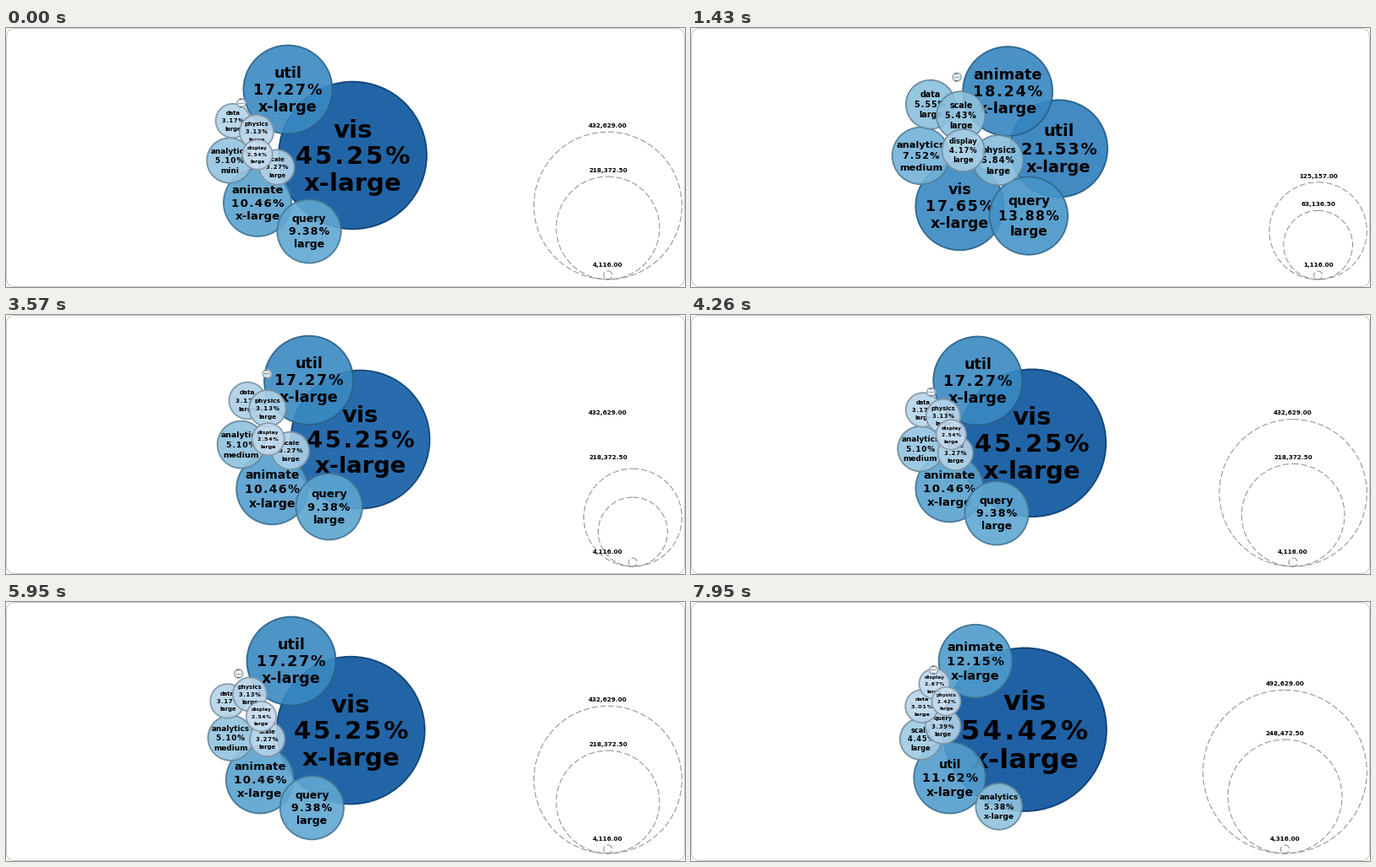
A matplotlib script for the animation above (8 s loop, 802 by 307 pixels).

```python
import numpy as np
import matplotlib.pyplot as plt
from matplotlib.animation import FuncAnimation
from matplotlib.patches import Circle, FancyBboxPatch

W, H, DPI = 802, 307, 64
LOOP, STEP, TICKS = 8000, 50, 3
PX = 72 / DPI          # one pixel in points
ALPHA = 0.9
RIGHT, BOTTOM = 798.3, 298
R_MIN = 5
CENTER = np.array([361.5, 150.2])
HAIR = "\u200a"


class State:
    """Shares in falling order; each rank keeps its own bubble."""

    def __init__(self, names, shares, high, low, r_max, x_large=3):
        self.names = names.split()
        self.shares = np.array(shares)
        self.values = high, (high + low) / 2, low
        self.x_large = x_large
        ratios = np.array(self.values) / high
        self.radii = self.radius(self.shares / shares[0], ratios[2], r_max)
        self.rings = self.radius(ratios, ratios[2], r_max)
        tone = np.clip(0.06 + 0.21 * np.log(self.shares), 0.08, 0.875)
        self.colors = plt.cm.Blues(tone)[:, :3]

    @staticmethod
    def radius(ratio, lowest, r_max):
        q = np.sqrt(lowest)
        part = np.maximum(np.sqrt(ratio) - q, 0) / (1 - q)
        return R_MIN + part * (r_max - R_MIN)

    def size(self, i, t):
        if i < self.x_large:
            return "x-large"
        if self.names[i] == "analytics":
            return "mini" if t < 500 else "medium"
        return "mini" if i == len(self.names) - 1 else "large"


ONE = State("vis util animate query analytics scale data physics display misc",
            [45.25, 17.27, 10.46, 9.38, 5.10, 3.27, 3.17, 3.13, 2.54, 0.43],
            432629, 4116, 87.4)
TWO = State("util animate vis query analytics physics data scale display misc",
            [21.53, 18.24, 17.65, 13.88, 7.52, 5.84, 5.55, 5.43, 4.17, 0.19],
            125157, 1116, 57.6)
THREE = State("vis animate util analytics scale query data display physics misc",
              [54.42, 12.15, 11.62, 5.38, 4.45, 3.39, 3.01, 2.67, 2.42, 0.48],
              492629, 4316, 96.8, 4)

# (start, state, pull towards the centre)
EVENTS = [(-9000, ONE, 0.13), (500, TWO, 0.13), (3420, ONE, 0.156),
          (5500, ONE, 0.13), (6360, THREE, 0.156)]

START = np.array([(409.5, 151), (333, 73), (297, 207), (358, 241), (264, 157),
                  (320, 165), (268, 110), (296, 123), (297, 150), (278, 89)])


def current(t):
    return max(i for i, event in enumerate(EVENTS) if t >= event[0])


def repulsion(pos, radii):
    gap = pos[:, None] - pos[None]
    dist2 = (gap ** 2).sum(axis=2) + np.eye(len(pos))
    return (gap * (radii ** 2 / 8 / dist2)[..., None]).sum(axis=1)


def simulate():
    """Force layout: bubbles repel by area, the centre pulls, heat cools."""
    pos, last = START.copy(), START.copy()
    heat, active, track = 0, 0, []
    for frame in range(LOOP // STEP):
        i = current(frame * STEP)
        if i != active:
            active, heat = i, 0.1
        _, state, pull = EVENTS[i]
        for _ in range(TICKS if heat else 0):
            last = last - heat * repulsion(pos, state.radii)
            pos, last = pos + 0.9 * (pos - last), pos
            pos = pos + heat * pull * (CENTER - pos)
            heat *= 0.99
        track.append(pos)
    return track


def ease_out(u):
    return 1 - (1 - min(u, 1)) ** 3


def ease_in_out(u):
    u = min(u, 1)
    return 4 * u ** 3 if u < 0.5 else 1 - 4 * (1 - u) ** 3


def mix(a, b, k):
    return a + (b - a) * k


plt.rcParams["font.family"] = "DejaVu Sans"
fig = plt.figure(figsize=(W / DPI, H / DPI), dpi=DPI, facecolor="white")
ax = fig.add_axes([0, 0, 1, 1])
ax.set_xlim(0, W)
ax.set_ylim(H, 0)
ax.axis("off")
ax.add_patch(FancyBboxPatch((0.5, 0.5), W - 1, H - 1, fc="white", ec="#c8c8c8",
                            boxstyle="round,pad=0,rounding_size=10", lw=PX))


def label(z):
    return ax.text(0, 0, "", ha="center", va="baseline", color="black",
                   weight="bold", size=7.3 * PX, zorder=z)


slots = range(len(START))
discs = [ax.add_patch(Circle((0, 0), 1, lw=1.8 * PX, zorder=10 + i)) for i in slots]
lines = [[label(10.5 + i) for _ in range(3)] for i in slots]
rings = [ax.add_patch(Circle((0, 0), 1, fill=False, ec="#8c8c8c", lw=PX,
                             ls=(0, (7, 3)))) for _ in range(3)]
tags = [label(5) for _ in range(3)]
track = simulate()


def draw_bubbles(centers, t, old, new, since):
    k = ease_out(since / 300)
    radii = mix(old.radii, new.radii, k)
    colors = mix(old.colors, new.colors, k)
    for i, (x, y) in enumerate(centers):
        discs[i].center = x, y
        discs[i].radius = radii[i]
        discs[i].set_facecolor((*colors[i], ALPHA))
        discs[i].set_edgecolor((*(colors[i] * 0.7), ALPHA))
        size = radii[i] / 3
        share = HAIR.join(f"{new.shares[i]:.2f}%")
        words = new.names[i], share, new.size(i, t)
        for row, (text, word) in enumerate(zip(lines[i], words)):
            text.set_text(word)
            text.set_position((x, y + size * 0.35 + (size + 2.5) * (row - 1)))
            text.set_fontsize(size * PX)


def draw_legend(old, new, since):
    radii = mix(old.rings, new.rings, ease_in_out(since / 950))
    for i in range(3):
        rings[i].center = RIGHT - radii[0], BOTTOM - radii[i]
        rings[i].radius = radii[i]
        tags[i].set_text(f"{new.values[i]:,.2f}")
        tags[i].set_position((RIGHT - new.rings[0], BOTTOM - 2 * new.rings[i] - 5))


def draw(frame):
    t = frame * STEP
    i = current(t)
    start, new, _ = EVENTS[i]
    old = EVENTS[max(i - 1, 0)][1]
    draw_bubbles(track[frame], t, old, new, t - start)
    draw_legend(old, new, t - start)
    return []


anim = FuncAnimation(fig, draw, frames=LOOP // STEP, interval=STEP,
                     init_func=lambda: draw(0), repeat=True, repeat_delay=0)
plt.show()
```
